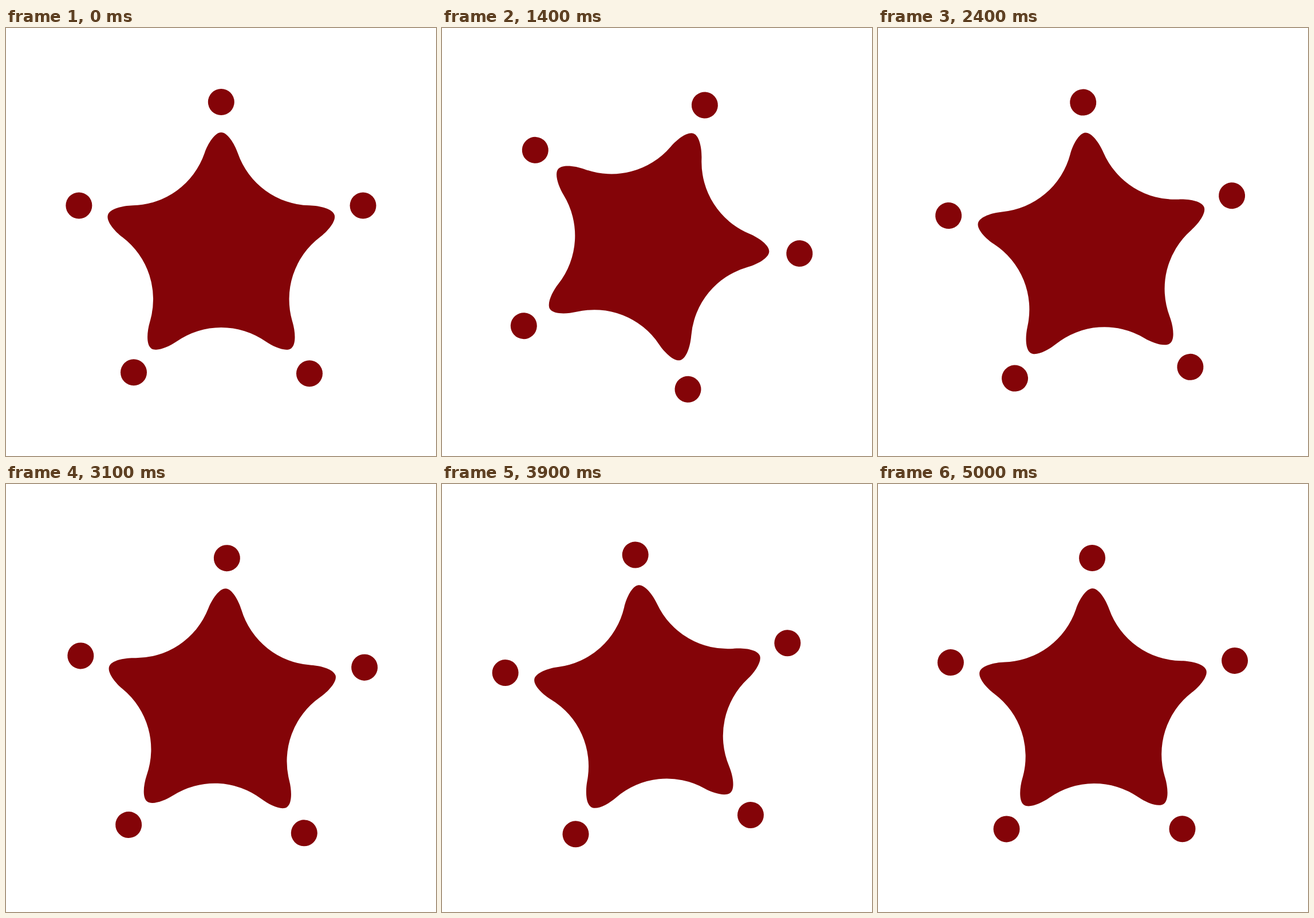
Write an HTML page that moves like this. It is 751 px wide and 746 px high and loops after 5100 ms.

```html
<!DOCTYPE html>
<html lang="en">
<head>
<meta charset="utf-8">
<title>Spinning star</title>
<style>
  html, body { margin: 0; width: 100%; height: 100%; overflow: hidden; background: #fff; }
  svg { display: block; width: 751px; height: 746px; fill: #840408; }
</style>
</head>
<body>
<svg viewBox="0 0 751 746">
  <g id="spinner">
    <g id="figure" transform="translate(375.8 390.1)">
      <path id="star"/>
    </g>
  </g>
</svg>
<script>
const LOOP = 5100, STEP = 100;
const PIVOT = '375.6 378.2';
const DOT_RADIUS = 23;
const DOT_ORBITS = [261.1, 260.5, 262.3, 259.9, 261.2];

// Two full turns, each eased by cubic-bezier(x1, 0, x2, 1)
const TURNS = [
  { start: 145, length: 2616, x1: 0.911, x2: 0.17 },
  { start: 2805, length: 2302, x1: 0.991, x2: 0.16 }
];

const spinner = document.getElementById('spinner');
const figure = document.getElementById('figure');

function rotated(x, y, arm) {
  const a = arm * Math.PI * 2 / 5, c = Math.cos(a), s = Math.sin(a);
  return (x * c - y * s).toFixed(2) + ' ' + (x * s + y * c).toFixed(2);
}

function starPath() {
  let d = 'M' + rotated(-29, -172, 0);
  for (let arm = 0; arm < 5; arm++) {
    const p = (x, y) => rotated(x, y, arm);
    d += `C${p(-23, -189)} ${p(-11, -208)} ${p(0, -208)}`
       + `C${p(11, -208)} ${p(23, -189)} ${p(29, -172)}`
       + `A136 136 0 0 0 ${rotated(-29, -172, arm + 1)}`;
  }
  return d + 'Z';
}

function addDot(orbit, arm) {
  const dot = document.createElementNS('http://www.w3.org/2000/svg', 'circle');
  const [x, y] = rotated(0, -orbit, arm).split(' ');
  dot.setAttribute('cx', x);
  dot.setAttribute('cy', y);
  dot.setAttribute('r', DOT_RADIUS);
  figure.append(dot);
}

function ease(x, x1, x2) {
  if (x <= 0) return 0;
  if (x >= 1) return 1;
  let lo = 0, hi = 1;
  for (let i = 0; i < 30; i++) {
    const s = (lo + hi) / 2, r = 1 - s;
    if (3 * r * r * s * x1 + 3 * r * s * s * x2 + s * s * s < x) lo = s;
    else hi = s;
  }
  return lo * lo * (3 - 2 * lo);
}

function angleAt(t) {
  return TURNS.reduce((sum, turn) =>
    sum + 360 * ease((t - turn.start) / turn.length, turn.x1, turn.x2), 0);
}

document.getElementById('star').setAttribute('d', starPath());
DOT_ORBITS.forEach(addDot);

const began = performance.now();

function draw() {
  // The motion advances in steps of 100 ms; the small lead absorbs timer jitter
  const t = (performance.now() - began + 8) % LOOP;
  const angle = angleAt(Math.floor(t / STEP) * STEP);
  spinner.setAttribute('transform', `rotate(${angle.toFixed(3)} ${PIVOT})`);
  requestAnimationFrame(draw);
}
draw();
</script>
</body>
</html>
```
